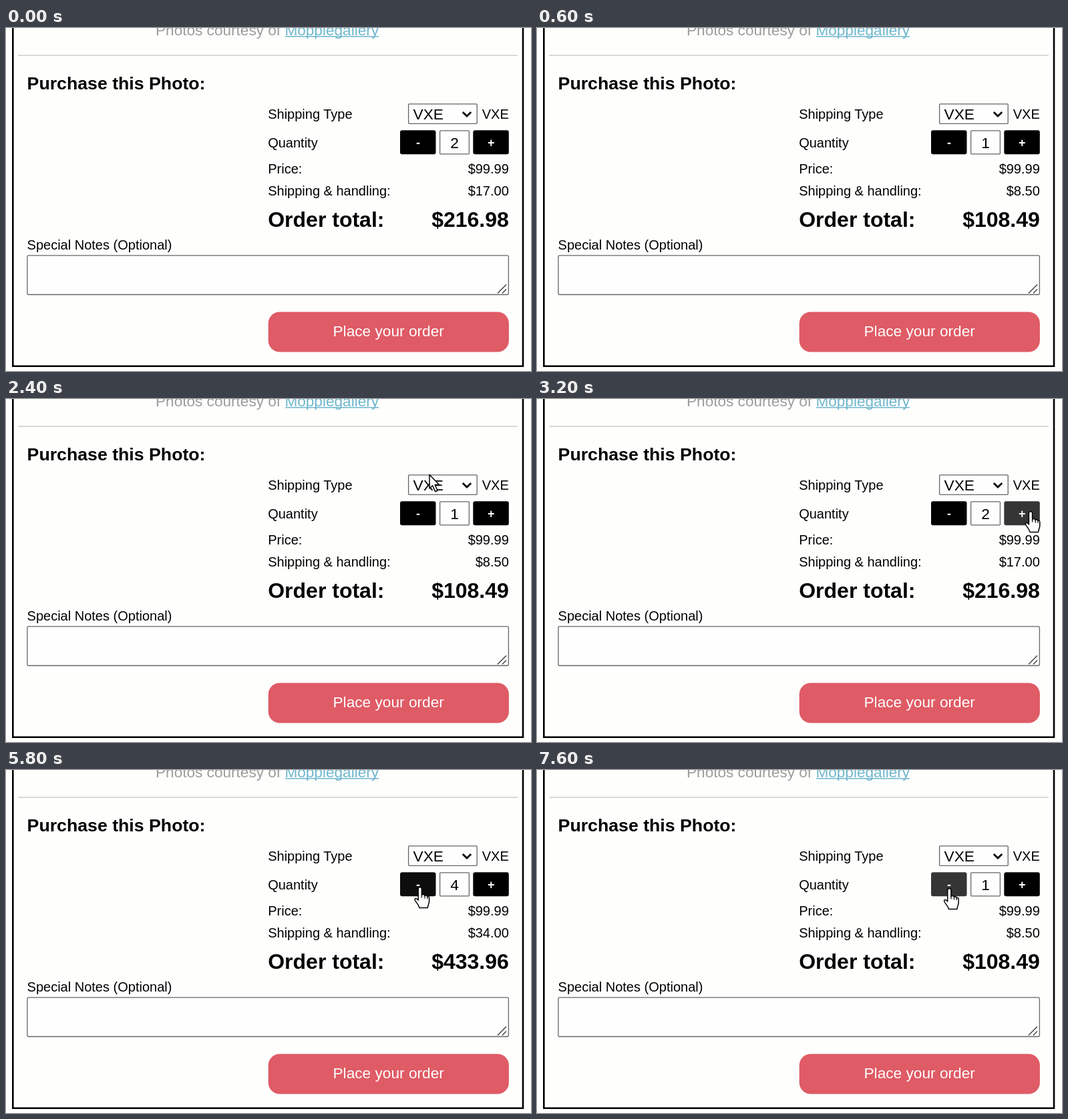
These frames come from a looping animation (786 px wide and 514 px high, 8000 ms). An HTML page:

```html
<!DOCTYPE html>
<html lang="en">
<head>
<meta charset="utf-8">
<title>Photo order form</title>
<style>
  html, body { margin: 0; width: 100%; height: 100%; overflow: hidden; background: #fefefd; }
  svg { display: block; width: 786px; height: 514px; }
  text { font: 20px "Liberation Sans", Arial, sans-serif; fill: #000; white-space: pre; }
  .end { text-anchor: end; }
  .mid { text-anchor: middle; }
  .field { fill: #fefefe; stroke: #666; stroke-width: 1.3; }
  .credit { font-size: 22.6px; fill: #9c9c9c; }
  .link { fill: #6fb7cd; }
  .heading { font-size: 26.7px; font-weight: bold; }
  .total { font-size: 32px; font-weight: bold; }
  .control { font-size: 22.7px; }
  .sign { font-size: 18px; font-weight: bold; fill: #fff; }
  .cursor { fill: #fff; stroke: #000; stroke-width: 1.5; stroke-linejoin: round; }
</style>
</head>
<body>
<svg viewBox="0 0 786 514">
  <rect width="786" height="514" fill="#fefefd"/>
  <g id="page">
    <path d="M10.3-5V506.7H774V-5" fill="none" stroke="#000" stroke-width="2.6"/>
    <text class="credit" x="224" y="10.5">Photos courtesy of <tspan class="link">Mopplegallery</tspan></text>
    <path d="M418 12.7H558" stroke="#6fb7cd" stroke-width="1.5"/>
    <path d="M18 41H766" stroke="#ccc" stroke-width="1.4"/>
    <text class="heading" x="31.6" y="92">Purchase this Photo:</text>

    <text x="392.2" y="136">Shipping Type</text>
    <rect class="field" x="602.6" y="113.9" width="102.6" height="29.4" rx="1"/>
    <text class="control" x="609.5" y="136.5">VXE</text>
    <path d="M683.8 126l6.2 6 6.2-6" fill="none" stroke="#000" stroke-width="2.7"/>
    <text class="end" x="752.8" y="136">VXE</text>

    <text x="392.2" y="179">Quantity</text>
    <rect id="minus" x="590" y="153.3" width="53.5" height="36" rx="3"/>
    <text class="sign mid" x="617" y="178">-</text>
    <rect class="field" x="649.6" y="153.8" width="43.8" height="35" rx="1"/>
    <text id="qty" class="control mid" x="671.5" y="179.5"></text>
    <rect id="plus" x="699.3" y="153.3" width="53.5" height="36" rx="3"/>
    <text class="sign mid" x="726.3" y="178">+</text>

    <text x="392.2" y="218">Price:</text>
    <text class="end" x="752.8" y="218">$99.99</text>
    <text x="392.2" y="251">Shipping &amp; handling:</text>
    <text id="shipping" class="end" x="752.8" y="251"></text>
    <text class="total" x="392.2" y="298">Order total:</text>
    <text id="total" class="total end" x="752.8" y="298"></text>

    <text x="31.6" y="332">Special Notes (Optional)</text>
    <rect class="field" x="31.9" y="340.9" width="720.5" height="58.6" rx="2"/>
    <path d="M736 397.5L749 384.5M743 397.5L749 391.5" stroke="#444" stroke-width="1.5"/>

    <rect x="392.7" y="425.5" width="360.2" height="60" rx="17" fill="#df5b65"/>
    <text class="control mid" x="572.7" y="461.5" style="fill:#fff">Place your order</text>

    <path id="arrow" class="cursor" d="M0 0V20.5L4.7 16.2L8.6 25.2L12 23.7L8.2 15H14.6Z"/>
    <path id="beam" d="M-4 0H4M0 0V22M-4 22H4" stroke="#000" stroke-width="1.5"/>
    <g id="hand" class="cursor">
      <path d="M-2.6 2.5a2.6 2.6 0 0 1 5.2 0V12C3 10.5 7 10.8 7.2 13C7.5 11.8 10.8 12 11 14.2C11.5 13.2 13.8 13.8 13.8 16V21C13.8 25 12 26 11.5 31H-1C-1.5 27-6 23-7.5 19.5C-8.6 16.8-5.5 15.6-2.6 19.5Z"/>
      <path d="M2.6 11V16M7.2 13V17M11 14.2V17.5" fill="none" stroke-width="1.2"/>
    </g>
  </g>
</svg>
<script>
const LOOP = 8000, PRICE = 99.99, SHIPPING = 8.5;
const el = id => document.getElementById(id);
const money = n => '$' + n.toFixed(2);
const held = (list, t) => list.findLast(([start]) => start <= t);

// Each entry holds from its start time until the next one.
const quantities = [
  [0, 2], [400, 0], [600, 1], [3200, 2], [3800, 3], [4400, 4],
  [6200, 3], [6600, 2], [7600, 1]
];
const moves = [
  [0, ''],
  [2000, 'arrow', 71, 48],
  [2200, 'arrow', 404, 85],
  [2400, 'arrow', 634, 113.5],
  [2600, 'arrow', 668, 120],
  [2800, 'hand', 735, 155],
  [3000, 'hand', 738, 173],
  [3200, 'hand', 739, 168.5],
  [5400, 'hand', 724, 174],
  [5600, 'beam', 678, 161],
  [5800, 'hand', 619.8, 175.5],
  [6000, 'hand', 617.3, 177.5]
];
const plusShades = [[0, '#000'], [2800, '#0d0d0d'], [3000, '#353535'], [5800, '#000']];
const minusShades = [[0, '#000'], [5800, '#0d0d0d'], [6000, '#353535']];

function render(t) {
  const qty = held(quantities, t)[1];
  el('page').style.display = qty ? '' : 'none';
  el('qty').textContent = qty;
  el('shipping').textContent = money(qty * SHIPPING);
  el('total').textContent = money(qty * (PRICE + SHIPPING));
  el('plus').setAttribute('fill', held(plusShades, t)[1]);
  el('minus').setAttribute('fill', held(minusShades, t)[1]);

  const [, kind, x, y] = held(moves, t);
  for (const id of ['arrow', 'beam', 'hand']) {
    el(id).style.display = id === kind ? '' : 'none';
  }
  if (kind) el(kind).setAttribute('transform', `translate(${x} ${y})`);
}

const begin = performance.now();
function tick() {
  render((performance.now() - begin) % LOOP);
  requestAnimationFrame(tick);
}
tick();
</script>
</body>
</html>
```
